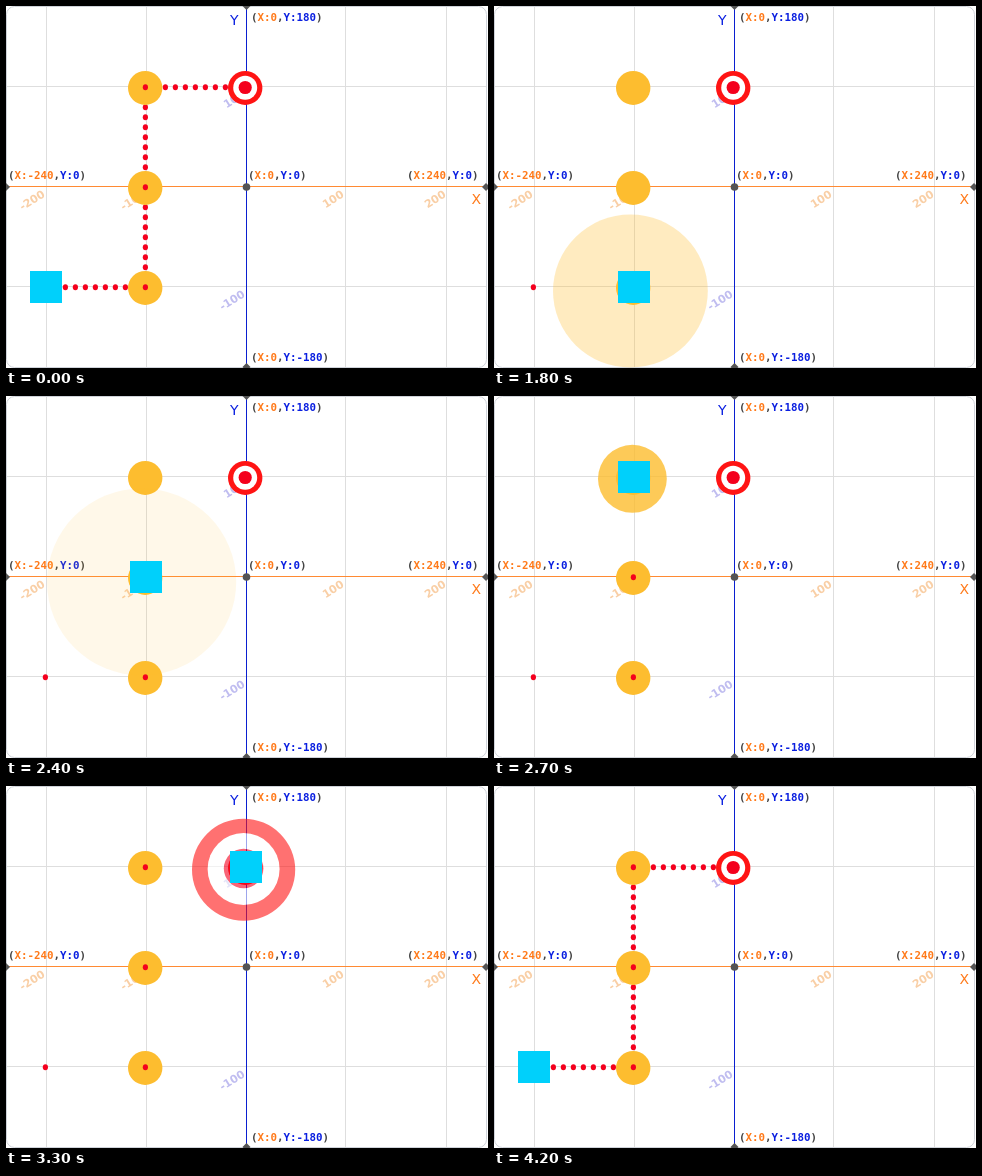
Recreate the animation shown at these times as an HTML page. Size 482 by 362 pixels, loop 5300 ms.

```html
<!DOCTYPE html>
<html lang="en">
<head>
<meta charset="utf-8">
<title>Path following on a coordinate plane</title>
<style>
  html, body { margin: 0; width: 100%; height: 100%; overflow: hidden; background: #fff; }
  svg { display: block; width: 100%; height: 100%; }
  .coord { font: bold 10.8px "DejaVu Sans Mono", monospace; fill: #444; }
  .axis { font: 14px "DejaVu Sans", sans-serif; }
  .tick { font: bold 11px "DejaVu Sans", sans-serif; text-anchor: middle; }
  .x { fill: #ff7a1a; }
  .y { fill: #0a1fe0; }
</style>
</head>
<body>
<svg viewBox="0 0 482 362">
  <defs>
    <ellipse id="dot" cx="-.6" cy=".2" rx="2.6" ry="3" fill="#f4001d"/>
    <ellipse id="node" cx="-.8" cy=".9" rx="17.2" ry="17" fill="#fdbd2f"/>
    <g id="goal">
      <ellipse cx="-.8" cy=".9" rx="17.2" ry="17" fill="#ff1414"/>
      <circle cx="-.8" cy=".7" r="12" fill="#fff"/>
      <circle cx="-.8" cy=".5" r="6.6" fill="#f4001d"/>
    </g>
    <rect id="square" x="-16" y="-16" width="32" height="32" fill="#00d0fb"/>
    <path id="diamond" d="M-4 0L0-4L4 0L0 4Z" fill="#555"/>
  </defs>
  <g id="plane"></g>
  <g id="scene"></g>
</svg>
<script>
const LOOP = 5300, FRAME = 100, SPACING = 10, LEG = 100;
const nodes = [[40, 281], [140, 281], [140, 181], [140, 81], [240, 81]];

// Each hop: arrival time, time the pulse starts, pulse growth per 100 ms (10 = fully faded).
const hops = [
  { at: 1500, pulseAt: 1700, growth: [4, 7, 9] },
  { at: 2000, pulseAt: 2100, growth: [1, 3, 6, 9] },
  { at: 2600, pulseAt: 2700, growth: [2, 5, 7] },
  { at: 3100, pulseAt: 3200, growth: [1, 4, 8] }
];
const ERASE = 1000, TRACE = 3600, DONE = 4200;

const plane = document.getElementById("plane");
const scene = document.getElementById("scene");

const put = (id, [x, y], scale = 1, opacity = 1) =>
  `<use href="#${id}" transform="translate(${x} ${y}) scale(${scale})" opacity="${opacity}"/>`;

const coord = (left, baseline, x, y) =>
  `<text class="coord" x="${left}" y="${baseline}">(<tspan class="x">X:${x}</tspan>,<tspan class="y">Y:${y}</tspan>)</text>`;

const tick = (x, y, value, color) =>
  `<text class="tick" fill="${color}" transform="translate(${x} ${y}) rotate(-32)" y="4">${value}</text>`;

function drawPlane() {
  const orange = "#f9cfa6", violet = "#c0bdf0";
  plane.innerHTML = `
    <rect x=".5" y=".5" width="480" height="361" rx="8" fill="#fff" stroke="#cfd3da"/>
    <path d="M40.5 1V361M140.5 1V361M339.5 1V361M440.5 1V361M1 80.5H480M1 280.5H480" stroke="#dedede"/>
    ${tick(26, 194, -200, orange)}${tick(127, 194, -100, orange)}
    ${tick(327, 193, 100, orange)}${tick(429, 193, 200, orange)}
    ${tick(228, 93, 100, violet)}${tick(226, 294, -100, violet)}
    <path d="M0 180.5H480" stroke="#ff8a33"/>
    <path d="M240.5 0V361" stroke="#0a1fd0"/>
    ${[[0, 181], [480, 181], [240.5, 0], [240.5, 361]].map(p => put("diamond", p)).join("")}
    <circle cx="240.5" cy="181" r="3.8" fill="#555"/>
    ${coord(245, 15, 0, 180)}${coord(2, 173, -240, 0)}${coord(242, 173, 0, 0)}
    ${coord(401, 173, 240, 0)}${coord(245, 355, 0, -180)}
    <text class="axis x" x="465.5" y="198">X</text>
    <text class="axis y" x="224" y="19">Y</text>`;
}

function pointAt(distance) {
  const i = Math.min(Math.floor(distance / LEG), nodes.length - 2);
  const f = distance / LEG - i;
  return nodes[i].map((v, k) => v + (nodes[i + 1][k] - v) * f);
}

function stateAt(t) {
  const total = LEG * (nodes.length - 1);
  if (t < ERASE || t >= DONE) return { square: nodes[0], trail: total, visited: 4 };
  if (t >= TRACE) {
    const trail = total * (t - TRACE) / (DONE - FRAME - TRACE);
    return { square: pointAt(trail), trail, visited: Math.min(4, Math.floor(trail / LEG) + 1) };
  }
  const visited = hops.filter(h => t >= h.at).length;
  const hop = hops[visited - 1];
  const growth = hop && hop.growth[(t - hop.pulseAt) / FRAME];
  return { square: nodes[visited], trail: -1, visited, growth };
}

function drawScene(t) {
  const { square, trail, visited, growth } = stateAt(t);
  let out = "";
  for (let d = 0; d <= trail; d += SPACING) out += put("dot", pointAt(d));
  for (const p of nodes.slice(1, 4)) out += put("node", p);
  out += put("goal", nodes[4]);
  for (const p of nodes.slice(0, visited)) out += put("dot", p);
  if (growth) out += put(visited === 4 ? "goal" : "node", square, 1 + growth / 2, 1 - growth / 10);
  scene.innerHTML = out + put("square", square);
}

let shown = -1;
const start = performance.now();
function play() {
  const elapsed = Math.max(0, performance.now() - start) % LOOP;
  const t = Math.floor(elapsed / FRAME) * FRAME;
  if (t !== shown) drawScene(shown = t);
  requestAnimationFrame(play);
}
drawPlane();
play();
</script>
</body>
</html>
```
